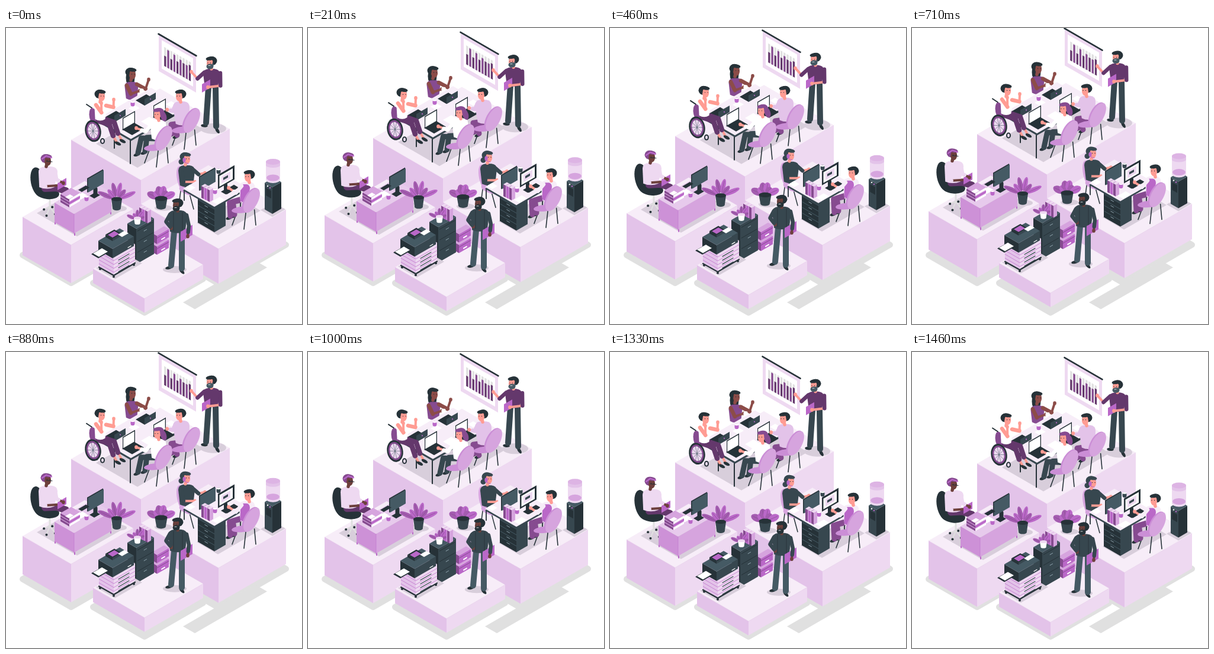
Recreate the animation shown at these times as an HTML page with a canvas. Size 500 by 500 pixels, loop 1500 ms.

```html
<!DOCTYPE html>
<html lang="en">
<head>
<meta charset="utf-8">
<title>Floating office</title>
<style>
html, body { margin: 0; width: 100%; height: 100%; overflow: hidden; background: #fff; }
canvas { display: block; width: 100vmin; height: 100vmin; }
</style>
</head>
<body>
<canvas id="stage"></canvas>
<script>
const LOOP = 1500, LIFT = 10, ISO = 0.577;
const canvas = document.getElementById('stage');
const ctx = canvas.getContext('2d');

// Shade of the base purple: positive towards white, negative towards black.
const tint = t => 'rgb(' + [186, 104, 200].map(c =>
  Math.round(t > 0 ? c + (255 - c) * t : c * (1 + t))) + ')';
const INK = '#263238', SLATE = '#37474f', STEEL = '#455a64', WHITE = '#fff', GREY = '#e0e0e0';
const PURPLE = tint(0), LILAC = tint(0.4), PALE = tint(0.75), MIST = tint(0.88);
const PLUM = tint(-0.46), GRAPE = tint(-0.28), SHADE = '#d8cedb';
const PINK = '#ff9c93', BROWN = '#8c4c48', DEEP = '#6d403c';

// --- Basic marks ---
function trace(p) {
  ctx.beginPath();
  for (let i = 0; i < p.length; i += 2) ctx.lineTo(p[i], p[i + 1]);
}
function poly(color, ...p) {
  trace(p);
  ctx.fillStyle = color;
  ctx.fill();
}
function line(color, width, ...p) {
  trace(p);
  ctx.strokeStyle = color;
  ctx.lineWidth = width;
  ctx.stroke();
}
function oval(color, x, y, rx, ry = rx, turn = 0) {
  ctx.beginPath();
  ctx.ellipse(x, y, rx, ry, turn, 0, 7);
  ctx.fillStyle = color;
  ctx.fill();
}

// --- Isometric pieces, placed by their front corner ---
function plate(color, x, y, a, b) {
  poly(color, x, y, x - a, y - a * ISO, x + b - a, y - (a + b) * ISO, x + b, y - b * ISO);
}
// Upright panel on its bottom front corner; a negative span runs to the left.
function wall(color, x, y, span, h) {
  const far = y - Math.abs(span) * ISO;
  poly(color, x, y, x + span, far, x + span, far - h, x, y - h);
}
function box(x, y, a, b, h, top, left, right) {
  wall(left, x, y + h, -a, h);
  wall(right, x, y + h, b, h);
  plate(top, x, y, a, b);
}
function platform(x, y, a, b, h) {
  box(x, y, a, b, h, MIST, tint(0.6), PALE);
  line(tint(0.6), 0.4, x - a, y - a * ISO, x, y, x + b, y - b * ISO);
}
// Footprint of a platform with a soft rounded margin.
function footprint(x, y, a, b) {
  plate(GREY, x, y, a, b);
  ctx.closePath();
  ctx.strokeStyle = GREY;
  ctx.lineWidth = 10;
  ctx.stroke();
}
function drawers(x, y, span, h, n, gap) {
  for (let i = 0; i < n; i++) {
    const top = y + i * h / n, slope = -Math.abs(span) / span * ISO;
    line(gap, 1, x, top, x + span, top + span * slope);
    const hx = x + span * 0.42, hy = top + span * 0.42 * slope + h / n * 0.35;
    line('#90a4ae', 1, hx, hy, hx + span * 0.18, hy + span * 0.18 * slope);
  }
}

// --- People ---
function joint(x1, y1, x2, y2, bend) {
  return [(x1 + x2) / 2 - (y2 - y1) * bend, (y1 + y2) / 2 + (x2 - x1) * bend];
}
function limb(color, width, x1, y1, x2, y2, bend = 0) {
  line(color, width, x1, y1, ...joint(x1, y1, x2, y2, bend), x2, y2);
}
// The sleeve reaches the elbow and covers the given part of the forearm.
function arm({ skin, sleeve }, x, y, hx, hy, bend, cover = 0) {
  const [ex, ey] = joint(x, y, hx, hy, bend);
  line(skin, 4, x, y, ex, ey, hx, hy);
  oval(skin, hx, hy, 2.8, 3.2);
  line(sleeve, 6.5, x, y, ex, ey, ex + (hx - ex) * cover, ey + (hy - ey) * cover);
}
function shoe(x, y, turn = -0.3) { oval(INK, x, y, 5.8, 2.6, turn); }
function legs(color, width, x, y, fx, fy, bend, gapX, gapY) {
  for (const k of [1, 0]) {
    const gx = fx + gapX * k, gy = fy + gapY * k;
    shoe(gx - 2, gy + 3);
    limb(color, width, x + gapX * k * 0.6, y + gapY * k, gx, gy, bend);
  }
}
function torso(color, x, y, w, h, lean = 0) {
  const r = w / 2, hip = r * 0.8, bx = x + lean, by = y + h;
  ctx.beginPath();
  ctx.moveTo(x - r * 0.35, y);
  ctx.quadraticCurveTo(x - r, y + 1, x - r, y + h * 0.25);
  ctx.lineTo(bx - hip, by - 2);
  ctx.quadraticCurveTo(bx, by + 3, bx + hip, by - 2);
  ctx.lineTo(x + r, y + h * 0.25);
  ctx.quadraticCurveTo(x + r, y + 1, x + r * 0.35, y);
  ctx.fillStyle = color;
  ctx.fill();
}
function head({ skin, hair, beard }, x, y, dir) {
  oval(hair, x - dir * 2, y - 3.5, 8.5, 7.5);
  line(skin, 5.5, x, y + 5, x - dir, y + 10);
  oval(skin, x + dir * 1.5, y + 1, 5.6, 7.8);
  if (beard) {
    oval(beard, x + dir * 1.5, y + 6, 6, 4.5);
    line(beard, 2.5, x - dir * 4, y, x - dir * 3, y + 5);
    line(WHITE, 0.8, x + dir, y + 4.5, x + dir * 4, y + 4.5);
  }
  oval(hair, x + dir, y - 7.5, 7.5, 3.2, dir * 0.15);
  oval(hair, x - dir * 6, y - 2, 2.6, 5);
  for (const d of [0.5, 5]) oval(INK, x + dir * d, y, 0.7);
}

// --- Furniture ---
function chairLegs(x, y) {
  for (const d of [-32, -12, 8])
    line(INK, 1.6, x + d * 0.7, y + 16, x + d, y + 49 - Math.abs(d + 12) * 0.35);
}
function chairShell(x, y) {
  oval(tint(0.25), x - 15, y + 16, 18, 5.5, -0.1);
  oval(tint(0.25), x - 1, y, 11, 23, 0.48);
  oval(LILAC, x + 1, y + 0.5, 10.5, 22.5, 0.48);
}
function laptop(x, y) {
  plate(INK, x + 16, y + 29, 17, 20);
  wall(INK, x, y + 21, 21, 21);
  wall(WHITE, x + 1.2, y + 18.5, 18.5, 17.5);
}
function laptopBack(x, y) {
  plate(INK, x + 15, y + 9, 15, 18);
  wall(SLATE, x + 15, y + 9, 19, 11);
  oval(PURPLE, x + 25, y - 2, 1.1);
}
function monitor(x, y) {
  plate(INK, x + 12, y + 34, 8, 10);
  line(INK, 7, x + 14, y + 18, x + 14, y + 27);
  wall(INK, x, y + 24, 27, 24);
  wall(STEEL, x + 1.5, y + 24, 26.5, 23);
}
function mug(color, x, y) {
  line(color, 7, x, y + 2, x, y + 4);
  oval(WHITE, x, y, 3.5, 1.4);
}
function books(x, y) {
  for (let i = 0; i < 3; i++)
    box(x + i * 5, y + i * 2.5, 4, 6, 20, PALE, i % 2 ? PURPLE : GRAPE, LILAC);
}
function plant(x, y, reach, n, fat) {
  for (let i = 0; i < n; i++) {
    const angle = (i / (n - 1) - 0.5) * 2.3, len = reach * (0.82 + 0.18 * Math.cos(i * 2.5));
    const dx = len * Math.sin(angle), dy = -len * Math.cos(angle);
    oval(i % 2 ? PURPLE : tint(-0.12), x + dx * 0.62, y + dy * 0.62, fat, len * 0.4, angle);
    line(GRAPE, 0.7, x, y, x + dx * 0.9, y + dy * 0.9);
  }
}
function pot(color, x, y, r, h) {
  poly(color, x - r, y, x + r, y, x + r * 0.75, y + h, x - r * 0.75, y + h);
  oval(color, x, y + h, r * 0.75, r * 0.35);
  oval(color === WHITE ? PALE : INK, x, y, r, r * 0.4);
}

// --- Upper platform ---
function projection() {
  wall(PALE, 321, 109, -63, 61);
  wall(WHITE, 316, 99, -53, 48);
  for (let i = 0; i < 9; i++) {
    const x = 270.5 + i * 5.2, y = 66 + i * 3, share = 0.75 - 0.2 * Math.cos(i * 2.9);
    wall(GREY, x, y, -3.3, 32);
    wall(i % 2 ? GRAPE : PLUM, x, y, -3.3, 32 * share);
  }
  line(INK, 2.6, 257.5, 10, 321.5, 47);
}
function presenter() {
  const look = { skin: PINK, sleeve: PLUM, hair: INK, beard: STEEL };
  oval(SHADE, 350, 170, 22, 9);
  shoe(335, 165, 0.1);
  shoe(357, 173, 1);
  limb(SLATE, 10, 342, 100, 338, 160);
  limb(SLATE, 10, 354, 100, 355, 166);
  torso(PLUM, 347, 69, 28, 32);
  arm(look, 335, 75, 313, 74, -0.5);
  wall(PURPLE, 331, 109, 14, 14);
  arm(look, 362, 76, 341, 100, -0.45);
  head(look, 346, 59, -1);
}
function colleague() {
  const look = { skin: BROWN, sleeve: BROWN, hair: INK };
  oval(INK, 210, 84, 7.5, 15);
  torso(GRAPE, 212, 91, 23, 30);
  arm(look, 221, 95, 241, 87, 0.6);
  arm(look, 204, 97, 226, 106, 0.45);
  mug(WHITE, 229, 104);
  head(look, 212, 78, 1);
}
function wheelchairUser() {
  const look = { skin: PINK, sleeve: PINK, hair: INK };
  line(INK, 2, 136, 129, 145, 135, 147, 165);
  oval(GRAPE, 148, 150, 7, 15, -0.2);
  for (const d of [8, 0]) {
    line(PINK, 4, 180 + d, 180 - d / 2, 187 + d, 193 - d / 2);
    shoe(189 + d, 195 - d / 2, 0.5);
    limb(PLUM, 8.5, 156 + d, 157 - d / 2, 181 + d, 182 - d / 2, -0.25);
  }
  torso(WHITE, 160, 126, 21, 30, -1);
  arm(look, 152, 130, 161, 127, 1.6);
  arm(look, 169, 131, 182, 121, 0.6);
  head(look, 160, 115, 1);
  oval(INK, 147, 174, 13.5, 18.5, -0.2);
  oval(GRAPE, 147, 174, 11, 15.5, -0.2);
  oval(PALE, 147, 174, 8.5, 12.5, -0.2);
  for (let a = 0; a < Math.PI; a += Math.PI / 5) {
    const dx = 10 * Math.cos(a), dy = 14 * Math.sin(a);
    line(STEEL, 0.6, 147 - dx, 174 - dy, 147 + dx, 174 + dy);
  }
  oval(INK, 163, 191, 4, 5);
  oval(PALE, 163, 191, 2, 3);
}
function meetingTable() {
  for (const [x, y, h] of [[154, 155, 35], [183, 172, 31], [210, 189, 40]])
    line(INK, 2, x, y, x, y + h);
  plate(SLATE, 211, 191, 58, 92);
  plate(MIST, 211, 187.5, 58, 92);
  laptopBack(168, 150);
  laptopBack(219, 122);
  plate(WHITE, 216, 141, 9, 10);
  mug(PURPLE, 214, 125);
  plate(WHITE, 240, 165, 12, 14);
  plate(WHITE, 279, 134, 9, 9);
  laptop(249, 131);
  laptop(197, 152);
}
function seatedMan() {
  const look = { skin: PINK, sleeve: tint(0.6), hair: INK };
  chairLegs(313, 156);
  legs(GRAPE, 9, 294, 161, 281, 178, 0.5, 8, 3);
  torso(tint(0.6), 296, 124, 28, 40, 2);
  arm(look, 286, 131, 272, 138, -0.4, 0.4);
  head(look, 294, 115, -1);
  chairShell(313, 156);
}
function seatedWoman() {
  const look = { skin: PINK, sleeve: WHITE, hair: GRAPE };
  chairLegs(266, 186);
  legs(SLATE, 9, 254, 187, 223, 211, 0.42, 12, -3);
  torso(WHITE, 257, 155, 27, 34);
  arm(look, 247, 162, 220, 169, -0.35, 0.4);
  head(look, 257, 146, -1);
  oval(GRAPE, 266, 149, 5, 9, -0.3);
  chairShell(266, 186);
}
function meetingRoom() {
  platform(228, 257, 118, 150, 84);
  projection();
  presenter();
  plate(SHADE, 222, 236, 70, 112);
  colleague();
  meetingTable();
  wheelchairUser();
  seatedMan();
  seatedWoman();
}

// --- Left platform ---
function manager() {
  const look = { skin: DEEP, sleeve: PALE, hair: GRAPE };
  for (let a = 0.6; a < 6; a += 1.5) {
    const x = 74 + 11 * Math.cos(a), y = 309 + 8 * Math.sin(a);
    line(GREY, 2, 74, 303, x, y);
    oval(INK, x, y + 1, 2);
  }
  line(GREY, 3, 74, 288, 74, 303);
  oval(INK, 54, 260, 12, 25, -0.2);
  oval(INK, 70, 279, 20, 10, 0.1);
  line(PLUM, 12, 66, 271, 85, 270, 101, 275);
  torso(PALE, 71, 234, 32, 37, -2);
  arm(look, 60, 243, 89, 266, 0.45, 0.1);
  wall(PURPLE, 87, 274, 15, 12);
  arm(look, 83, 243, 97, 262, 0.25, 0.3);
  head(look, 69, 224, 1);
  line(PURPLE, 2.2, 61, 221, 68, 216, 77, 219);
  line(INK, 1, 68, 225, 78, 226);
}
function managerDesk() {
  for (const [x, y] of [[83, 326], [116, 345], [177, 309]]) line(PURPLE, 2, x, y, x, y + 5);
  box(115, 314, 33, 63, 33, tint(0.65), tint(0.27), LILAC);
  line(PURPLE, 0.5, 115, 314, 115, 347);
  monitor(137, 254);
  plate(INK, 128, 277, 6, 13);
  plate(WHITE, 126, 290, 9, 12);
  for (let i = 0; i < 3; i++)
    box(107, 299 - i * 5, 15, 18, 4, LILAC, GRAPE, i % 2 ? PURPLE : WHITE);
  plate(WHITE, 106, 289, 6, 8);
  mug(PURPLE, 136, 285);
}
function leftRoom() {
  platform(110, 366.5, 82, 105, 64.5);
  plate(SHADE, 120, 352, 68, 76);
  manager();
  managerDesk();
  oval(SHADE, 191, 305, 13, 5);
  plant(187, 291, 34, 6, 4);
  pot(SLATE, 187, 289, 9, 16);
}

// --- Right platform ---
function waterCooler() {
  plate(SHADE, 450, 319, 20, 22);
  box(450, 269, 13, 15, 45, STEEL, SLATE, INK);
  wall(INK, 448, 288, -9, 13);
  oval(WHITE, 442, 267, 1.2);
  oval(PURPLE, 446, 270, 1.2);
  line(PALE, 24, 451, 239, 451, 245);
  poly(PALE, 439, 228, 463, 228, 463, 256, 439, 256);
  oval(PALE, 451, 256, 12, 6);
  oval(tint(0.4), 451, 253, 11, 5.5);
  poly(tint(0.6), 439, 226, 463, 226, 463, 232, 439, 232);
  oval(tint(0.6), 451, 232, 12, 4);
  oval(tint(0.5), 451, 226, 12, 5);
}
function headsetWoman() {
  const look = { skin: PINK, sleeve: SLATE, hair: SLATE };
  line(INK, 1.5, 296, 268, 293, 291);
  line(INK, 1.5, 310, 280, 317, 306);
  oval(LILAC, 297, 255, 8, 22, -0.2);
  oval(LILAC, 309, 275, 17, 7, 0.3);
  line(SLATE, 11, 307, 267, 322, 278);
  torso(SLATE, 305, 232, 28, 36);
  arm(look, 317, 240, 336, 245, 0.25);
  arm(look, 296, 241, 319, 260, 0.4);
  oval(SLATE, 296, 226, 4.5);
  head(look, 304, 221, 1);
  oval(PURPLE, 301, 223, 2.6, 4);
  line(PURPLE, 1, 301, 227, 308, 229);
}
function workstation() {
  line(INK, 1.8, 301, 274, 301, 291);
  line(INK, 1.8, 396, 278, 396, 311);
  box(352, 304, 28, 19, 41, SLATE, INK, SLATE);
  drawers(352, 306, -27, 38, 4, STEEL);
  plate(SLATE, 352, 305, 53, 47);
  plate(MIST, 352, 302, 53, 47);
  plate(WHITE, 311, 275, 9, 9);
  monitor(326, 251);
  books(334, 269);
  mug(SLATE, 359, 239);
  plate(INK, 371, 281, 8, 9);
  line(INK, 6, 371, 265, 371, 275);
  wall(INK, 358, 272, 28, 24);
  wall(WHITE, 360.5, 268, 22.5, 18);
  wall(PALE, 364, 263, 15, 12);
  wall(SLATE, 367, 257, 8, 4);
  plate(INK, 373, 281, 8, 20);
  mug(PURPLE, 353, 273);
  plate(WHITE, 357, 298, 9, 13);
}
function deskMan() {
  const look = { skin: PINK, sleeve: MIST, hair: INK };
  chairLegs(414, 291);
  legs(GRAPE, 9, 400, 290, 379, 318, 0.42, 7, -3);
  torso(MIST, 407, 260, 27, 36);
  torso(PURPLE, 404, 264, 16, 30, -2);
  arm(look, 398, 267, 376, 270, -0.45, 0.25);
  head(look, 410, 251, -1);
  chairShell(414, 291);
}
function rightRoom() {
  platform(359, 373, 131, 114, 59);
  oval(SHADE, 266, 304, 15, 5);
  plant(262, 289, 25, 6, 6);
  pot(SLATE, 262, 288, 10.5, 15);
  waterCooler();
  plate(SHADE, 358, 350, 36, 72);
  headsetWoman();
  workstation();
  deskMan();
}

// --- Front platform ---
function printer() {
  plate(SHADE, 184, 424, 32, 46);
  for (const [x, y] of [[159, 407], [182, 420], [216, 400]]) oval(INK, x, y, 2);
  box(182, 386, 25, 36, 31, PALE, tint(0.6), PALE);
  for (let i = 0; i < 4; i++) {
    const y = 393 + i * 6.5;
    line(PURPLE, 0.7, 157, y - 14.4, 182, y, 218, y - 20.8);
    line(SLATE, 1.2, 190, y - 1, 208, y - 11.4);
  }
  line(INK, 2.2, 157, 404, 182, 418, 218, 397);
  box(180, 373, 24, 36, 16, STEEL, INK, SLATE);
  box(180, 356, 12, 15, 4, INK, INK, SLATE);
  plate(PURPLE, 180, 354, 8, 11);
  plate(WHITE, 196, 353, 7, 11);
  plate(INK, 156, 389, 12, 19);
  plate(WHITE, 157, 386.5, 10, 15);
  line(WHITE, 1.2, 206, 371, 211, 368);
}
function storage() {
  for (const y of [370, 352]) {
    box(255, y - 1, 8, 20, 14, LILAC, GRAPE, PURPLE);
    line(GRAPE, 1, 255, y + 3, 275, y - 8.5);
    line(WHITE, 2, 263, y + 5, 268, y + 2);
  }
  box(220, 339, 15, 30, 60, STEEL, INK, SLATE);
  drawers(222, 343, 26, 54, 3, INK);
  books(229, 305);
  plant(222, 324, 19, 5, 3);
  pot(WHITE, 222, 321, 6, 9);
}
function visitor() {
  const look = { skin: DEEP, sleeve: SLATE, hair: INK, beard: INK };
  oval(SHADE, 285, 408, 20, 6);
  shoe(275, 405, -0.2);
  shoe(297, 411, 0.8);
  limb(STEEL, 10, 284, 344, 279, 401);
  limb(STEEL, 10, 297, 344, 297, 406);
  torso(SLATE, 290, 308, 32, 38);
  arm(look, 277, 315, 279, 338, 0.33, 0.8);
  wall(PURPLE, 295, 361, 20, 17);
  arm(look, 305, 316, 307, 352, -0.08, 0.6);
  for (const x of [283, 298]) line(INK, 0.8, x, 311, x, 342);
  head(look, 289, 299, -1);
}
function frontRoom() {
  platform(234, 457, 87, 99, 24);
  storage();
  printer();
  visitor();
}

function groundShadow() {
  footprint(110, 431, 82, 105);
  footprint(234, 481, 87, 99);
  footprint(359, 432, 60, 114);
  plate(GREY, 319, 475, 20, 122);
}

function draw(now) {
  const size = Math.round(Math.min(innerWidth, innerHeight) * (devicePixelRatio || 1));
  if (canvas.width !== size) canvas.width = canvas.height = size;
  const scale = size / 500, phase = (now % LOOP) / LOOP;
  ctx.setTransform(scale, 0, 0, scale, 0, 0);
  ctx.lineCap = ctx.lineJoin = 'round';
  ctx.fillStyle = WHITE;
  ctx.fillRect(0, 0, 500, 500);
  groundShadow();
  ctx.translate(0, -LIFT * (1 - Math.abs(1 - 2 * phase)));
  meetingRoom();
  leftRoom();
  rightRoom();
  frontRoom();
}

let start;
function tick(now) {
  start ??= now;
  draw(now - start);
  requestAnimationFrame(tick);
}
draw(0);
requestAnimationFrame(tick);
</script>
</body>
</html>
```
